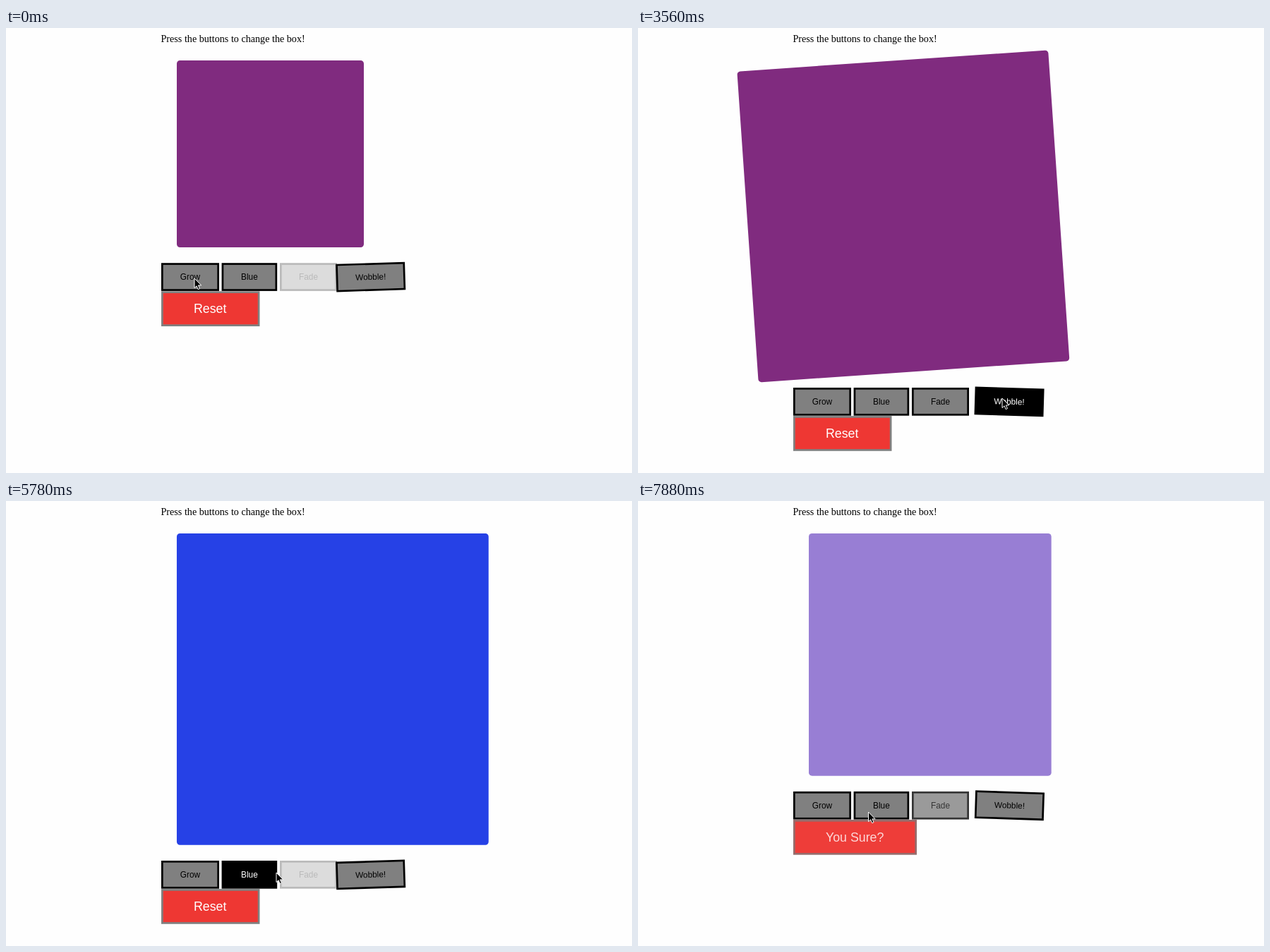
Write an HTML page that moves like this. It is 887x631 px and loops after 8 s.

```html
<!DOCTYPE html>
<html lang="en">
<head>
<meta charset="utf-8">
<title>Box buttons</title>
<style>
  html, body { margin: 0; width: 100%; height: 100%; overflow: hidden; background: #fefefe; }
  svg { display: block; width: 887px; height: 631px; }
  text { font-family: "Liberation Sans", Arial, sans-serif; font-size: 11.85px; text-anchor: middle; }
  .intro { font: 14.15px "Liberation Serif", Times, serif; text-anchor: start; }
  .reset { font-size: 17.8px; text-anchor: start; }
</style>
</head>
<body>
<svg id="stage" viewBox="0 0 887 631">
  <text class="intro" x="219.5" y="20">Press the buttons to change the box!</text>
</svg>
<script>
const LOOP = 8000, SMALL = 265, LARGE = 441.8;
const PURPLE = [128, 43, 127], BLUE = [24, 68, 247], DEEP_BLUE = [24, 32, 255];
const RED = [238, 55, 51], PALE = [242, 212, 212];
const WHITE = [255, 255, 255], GRAY = [128, 128, 128], EDGE_RED = [237, 25, 25];

const stage = document.getElementById('stage');

function make(parent, tag, attrs) {
  const node = document.createElementNS('http://www.w3.org/2000/svg', tag);
  set(node, attrs);
  return parent.appendChild(node);
}
function set(node, attrs) {
  for (const key in attrs) node.setAttribute(key, attrs[key]);
}

const lerp = (a, b, p) => a + (b - a) * p;
const ramp = (t, from, to) => Math.min(1, Math.max(0, (t - from) / (to - from)));
const mix = (a, b, p) => a.map((v, i) => lerp(v, b[i], p));
const rgb = c => `rgb(${c.map(Math.round)})`;
const swing = p => (1 - Math.cos(Math.PI * p)) / 2;

// CSS "ease": cubic-bezier(.25, .1, .25, 1)
function ease(p) {
  let lo = 0, hi = 1, u = p;
  for (let i = 0; i < 20; i++) {
    u = (lo + hi) / 2;
    const x = .75 * u * (1 - u) + u ** 3;
    if (x < p) lo = u; else hi = u;
  }
  return .3 * u * (1 - u) ** 2 + 3 * u * u * (1 - u) + u ** 3;
}

// Interpolates rows of [time, ...values]
function track(rows, t, curve) {
  let i = 0;
  while (i < rows.length - 2 && t >= rows[i + 1][0]) i++;
  const a = rows[i], b = rows[i + 1];
  return mix(a, b, curve(ramp(t, a[0], b[0]))).slice(1);
}

const box = make(stage, 'rect', { rx: 4.5 });
const row = make(stage, 'g', {});

function button(label, x, w, hoverFrom, hoverTo) {
  const g = make(row, 'g', {});
  const face = make(g, 'rect', { x: x + 1.35, y: 1.35, width: w - 2.7, height: 37, stroke: '#000', 'stroke-width': 2.7 });
  const text = make(g, 'text', { x: x + w / 2, y: 23.8 });
  text.textContent = label;
  return { g, face, text, hoverFrom, hoverTo };
}
const buttons = [
  button('Grow', 220, 82, 1400, 2500),
  button('Blue', 305.6, 78.6, 4720, 5850),
  button('Fade', 388, 81, 5900, 6600),
  button('Wobble!', 472.5, 98, 3000, 3900)
];
const fadeButton = buttons[2].g, wobbleButton = buttons[3].g;

const resetFace = make(row, 'rect', { x: 221.35, y: 41.45, height: 47, 'stroke-width': 2.7 });
const resetText = make(row, 'text', { class: 'reset', x: 266, y: 70.8 });

const cursor = make(stage, 'path', {
  d: 'M0 0V13.6L3.1 10.8 5.2 15.6 7.5 14.6 5.4 9.9H9.7Z',
  fill: '#000', stroke: '#fff', 'stroke-width': 1
});

const cursorPath = [
  [0, 267, 355], [1250, 267, 355], [1650, 243, 356], [2450, 243, 356],
  [3050, 516, 525], [3800, 516, 525], [4250, 440, 557], [4750, 341, 528],
  [5350, 341, 528], [5780, 383, 527], [6050, 428, 530], [6450, 428, 530],
  [6830, 345, 561], [7100, 330, 573], [7400, 330, 573], [7800, 326.5, 441], [8000, 326.5, 441]
];

// time share, shift as a share of the width, degrees
const wobble = [
  [0, 0, 0], [.15, -.25, -5], [.3, .2, 3], [.45, -.15, -3],
  [.6, .1, 2], [.75, -.05, -1], [1, 0, 0]
];

// Turning points of the swaying button, left and right by turns
const sway = [-60, 620, 1350, 2520, 3050, 3640, 4200, 4930, 5690, 6850, 7430, 7900, 8500]
  .map((t, i) => [t, i % 2 ? 5 : -5]);

function drawBox(t, size) {
  const back = ramp(t, 7326, 8326);
  const [dx, deg] = track(wobble, ramp(t, 3384, 5814), ease);
  let color = mix(PURPLE, BLUE, ramp(t, 4920, 5920));
  color = mix(color, DEEP_BLUE, ramp(t, 6150, 7150));
  color = mix(color, PURPLE, back);
  const faded = lerp(1, .075, ramp(t, 6150, 7150));
  const mid = size / 2;
  set(box, {
    x: 242, y: 46, width: size, height: size,
    fill: rgb(color), 'fill-opacity': lerp(faded, 1, back),
    transform: `translate(${dx * size} 0) rotate(${deg} ${242 + mid} ${46 + mid})`
  });
}

function drawButtons(t) {
  for (const b of buttons) {
    const over = t >= b.hoverFrom && t < b.hoverTo;
    set(b.face, { fill: over ? '#000' : '#808080' });
    set(b.text, { fill: over ? '#fff' : '#000' });
  }
  const pulse = .64 - .44 * Math.cos((31 / 360 + t / 1510) * 2 * Math.PI);
  set(fadeButton, { opacity: Math.min(1, pulse) });
  const [dx] = track(sway, t, swing);
  set(wobbleButton, { transform: `translate(${dx} 0) rotate(${dx * .37} 521.5 19.85)` });
}

function drawReset(t) {
  const asking = t >= 6950;
  const k = ramp(t, 6930, 7233) * (1 - ramp(t, 7480, 7980));
  set(resetFace, {
    width: asking ? 172.3 : 136.8,
    fill: rgb(mix(RED, PALE, k * k)),
    stroke: rgb(mix(GRAY, EDGE_RED, k))
  });
  set(resetText, { fill: rgb(mix(WHITE, RED, k)) });
  resetText.textContent = asking ? 'You Sure?' : 'Reset';
}

function draw(t) {
  const grown = ramp(t, 1855, 2855) - ramp(t, 7326, 8326);
  const size = lerp(SMALL, LARGE, grown);
  drawBox(t, size);
  set(row, { transform: `translate(0 ${size + 68.2})` });
  drawButtons(t);
  drawReset(t);
  set(cursor, { transform: `translate(${track(cursorPath, t, swing)})` });
}

const start = performance.now();
function tick(now) {
  draw(Math.max(0, now - start) % LOOP);
  requestAnimationFrame(tick);
}
draw(0);
requestAnimationFrame(tick);
</script>
</body>
</html>
```
